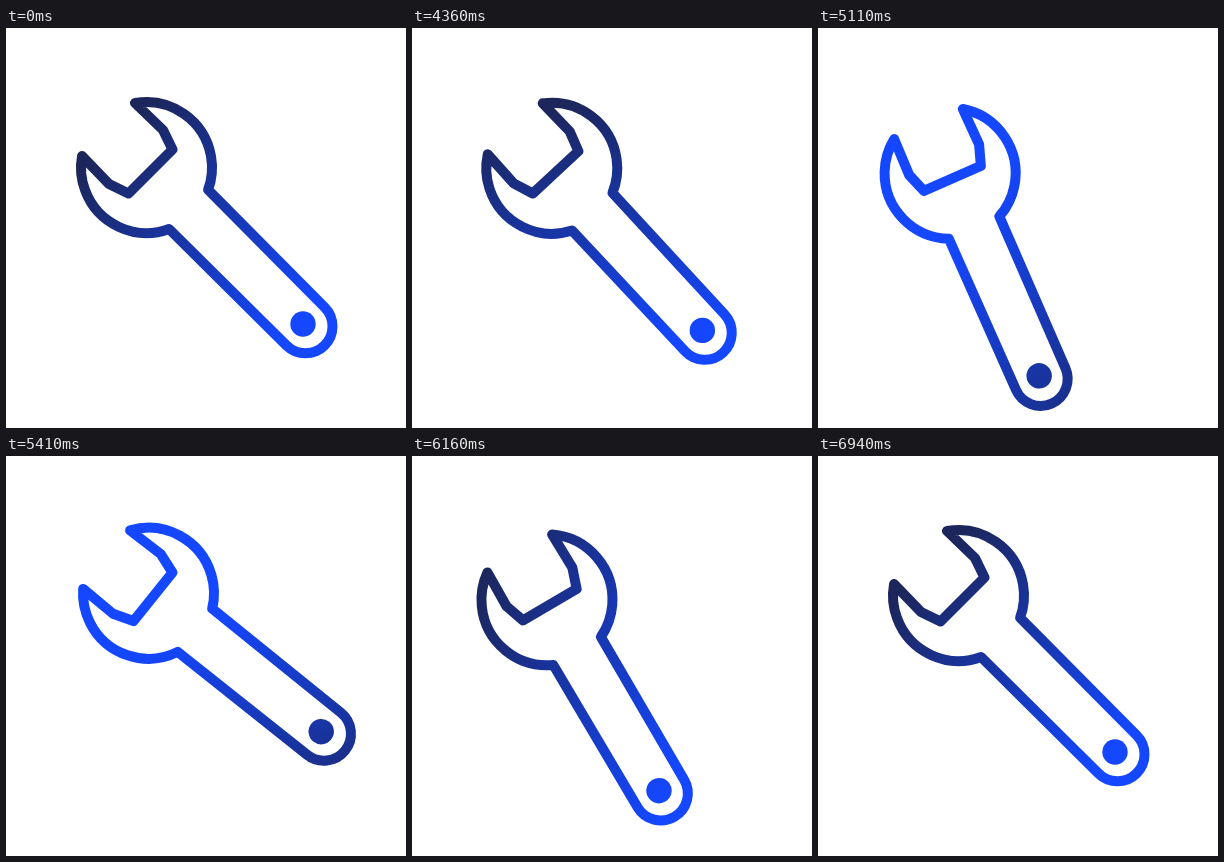
These frames come from a looping animation (400 by 400 pixels, 7 s). An HTML page with a canvas:

```html
<!DOCTYPE html>
<html lang="en">
<head>
<meta charset="utf-8">
<title>Wrench</title>
<style>
  html, body { margin: 0; width: 100%; height: 100%; overflow: hidden; background: #fff; }
  canvas { display: block; width: 100vmin; height: 100vmin; }
</style>
</head>
<body>
<canvas id="stage" width="400" height="400"></canvas>
<script>
const ctx = document.getElementById('stage').getContext('2d');

const LOOP = 7000, REST = 4000, STEP = 30, LAST = 2940;
const DARK = '#1c265a', BRIGHT = '#1447ff';
const PIVOT = { x: 121, y: 120 };
// The dark and bright ends orbit a common centre at different distances.
const SHADE = { x: 238, y: 238, dark: 185, bright: -77, turn: 2750 };
const RAD = Math.PI / 180;

// [time in ms, degrees]
const SWING = [
  [0, 0], [235, 22], [450, -10], [672, 22], [897, -10], [1131, 22],
  [1365, -10], [1577, 22], [1789, -10], [2027, 22], [2453, -10], [2900, 0]
];

const ease = s => s * s * (3 - 2 * s);

function swingAt(t) {
  const next = SWING.findIndex(key => key[0] > t);
  if (next < 0) return 0;
  const [t0, a] = SWING[next - 1];
  const [t1, b] = SWING[next];
  return a + (b - a) * ease((t - t0) / (t1 - t0));
}

function buildWrench() {
  const head = { x: 140.5, y: 139.5, r: 65.5 };
  const cap = { x: 299.5, y: 298.3, r: 27 };
  const angleTo = (x, y) => Math.atan2(y - head.y, x - head.x);
  const path = new Path2D();
  path.moveTo(76, 128);
  path.lineTo(103, 156);
  path.lineTo(122.5, 165.5);
  path.lineTo(166.5, 121.5);
  path.lineTo(157, 102);
  path.lineTo(129, 75);
  path.arc(head.x, head.y, head.r, angleTo(129, 75), angleTo(202, 161.8));
  path.arc(cap.x, cap.y, cap.r, -45 * RAD, 135 * RAD);
  path.arc(head.x, head.y, head.r, angleTo(163, 200.8), angleTo(76, 128));
  path.closePath();
  return path;
}

const wrench = buildWrench();
const hole = new Path2D();
hole.arc(297, 296, 12.7, 0, 2 * Math.PI);

function shadeAt(t) {
  const turned = ease(Math.min(t / SHADE.turn, 1) ** 0.9);
  const angle = (-135 + 360 * turned) * RAD;
  const along = reach => [SHADE.x + Math.cos(angle) * reach, SHADE.y + Math.sin(angle) * reach];
  const shade = ctx.createLinearGradient(...along(SHADE.dark), ...along(SHADE.bright));
  shade.addColorStop(0, DARK);
  shade.addColorStop(1, BRIGHT);
  return shade;
}

function draw(t) {
  ctx.setTransform(1, 0, 0, 1, 0, 0);
  ctx.fillStyle = '#fff';
  ctx.fillRect(0, 0, 400, 400);
  ctx.translate(PIVOT.x, PIVOT.y);
  ctx.rotate(swingAt(t) * RAD);
  ctx.translate(-PIVOT.x, -PIVOT.y);
  ctx.strokeStyle = ctx.fillStyle = shadeAt(t);
  ctx.lineWidth = 10;
  ctx.lineJoin = ctx.lineCap = 'round';
  ctx.stroke(wrench);
  ctx.fill(hole);
}

function tick() {
  const active = Math.max(0, performance.now() % LOOP - REST);
  draw(Math.min(Math.floor(active / STEP) * STEP, LAST));
  requestAnimationFrame(tick);
}
tick();
</script>
</body>
</html>
```
